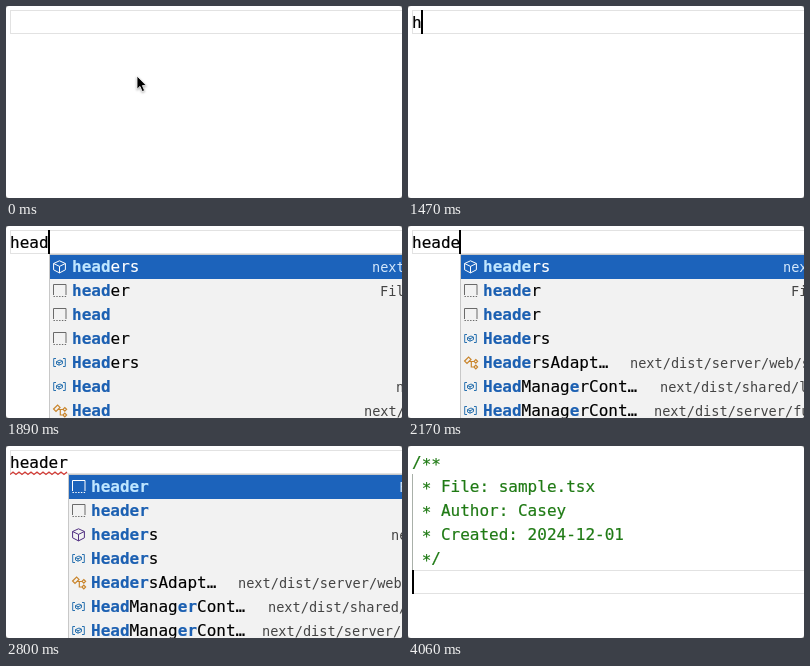
An HTML page that plays this animation: 396 by 192 pixels, repeating every 4.55 s.

```html
<!DOCTYPE html>
<html lang="en">
<head>
<meta charset="utf-8">
<title>Snippet completion</title>
<style>
html, body { margin: 0; width: 100%; height: 100%; overflow: hidden; background: #777; }
#stage { position: relative; width: 396px; height: 192px; overflow: hidden; background: #fff;
  border-radius: 3px; font: 16px/24px "DejaVu Sans Mono", monospace; color: #000; }
#stage > * { position: absolute; }
pre { margin: 0; font: inherit; -webkit-text-stroke: .2px; transform: translateY(.5px); will-change: transform; }
#line { left: 4px; width: 400px; height: 22px; border: 1px solid #e2e2e2; }
#text { left: 4px; top: 4px; }
#note { left: 4px; top: 4px; color: #1f7a14; }
#note i { position: relative; top: 2px; font-style: normal; }
#guide { left: 4px; top: 28px; width: 1px; height: 96px; background: #a9b0a9; }
#caret { width: 2px; height: 24px; background: #000; }
#squiggle { left: 4px; top: 25px; }
#popup { top: 29px; width: 460px; height: 168px; background: #f2f2f2; box-shadow: 0 0 0 1px #c8c8c8; }
.row { position: relative; height: 24px; white-space: pre; }
.row > * { position: absolute; top: 0; }
.row svg { left: 3px; top: 5px; overflow: visible; }
.label { left: 22px; -webkit-text-stroke: .15px; }
.label b { color: #1c60b2; }
.detail { font-size: 13.6px; color: #444; }
.row.on { background: #1c63bb; color: #fff; }
.on .label b { color: #bfe6ff; }
.on .detail { color: #d5e8fb; }
.on svg { color: #fff !important; }
#arrow, #beam { left: 0; top: 0; overflow: visible; }
</style>
</head>
<body>
<div id="stage">
  <div id="line"></div>
  <div id="guide"></div>
  <pre id="text"></pre>
  <pre id="note">/**
 * File: sample.tsx
 * Author: Casey
 * Created: 2024-12-01
 */</pre>
  <svg id="squiggle" width="58" height="5" fill="none" stroke="#d23a34" stroke-width="1.3"></svg>
  <div id="caret"></div>
  <div id="popup"></div>
  <svg id="beam" width="12" height="18" fill="none" stroke="#111" stroke-width="1.2">
    <path d="M54 10.6Q57 10.6 57.5 12.5Q58 10.6 61 10.6M57.5 12V24M54 25.4Q57 25.4 57.5 23.5Q58 25.4 61 25.4M56 18.5H59"/>
  </svg>
  <svg id="arrow" width="12" height="18">
    <path d="M0 0V13.2L3 10.4L5.2 15.6L7.6 14.6L5.4 9.6H9.4Z" fill="#000" stroke="#fff" stroke-width=".8"
      style="filter:drop-shadow(0 1px 1px #0005)"/>
  </svg>
</div>
<script>
const LOOP = 4550, STEP = 70, CHAR = 9.633;
const el = id => document.getElementById(id);

const icons = {
  cube: ['#4f2d80', '<path d="M6.5 .8L12.4 3.5V9.8L6.5 12.9L.6 9.8V3.5ZM.6 3.5L6.5 6.4L12.4 3.5M6.5 6.4V12.9"/>'],
  snip: ['#6a6a6a', '<path d="M.5 11V.5H13V11"/><path d="M.5 12.5H13.5" stroke-dasharray="1.4 1.4"/>'],
  vari: ['#2a72b0', '<path d="M3 2.5H.7V10.5H3M10 2.5H12.3V10.5H10M3.5 5.6L7 4L9.5 5.2V7.6L6 9.2L3.5 8ZM3.5 5.6L6 6.8L9.5 5.2M6 6.8V9.2"/>'],
  clas: ['#c9852c', '<path stroke-width="1.2" d="M.6 5L4.6 1L7 3.4L3 7.4ZM5.5 5.5H10M7.3 5.5V11H10M10 5.3L11.8 3.5L13.6 5.3L11.8 7.1ZM10 11L11.8 9.2L13.6 11L11.8 12.8Z"/>']
};

// icon, label, detail, detail offset
const headers = ['cube', 'headers', 'next/headers', 322];
const fileHeader = ['snip', 'header', 'File header', 330];
const plainHeader = ['snip', 'header'];
const typeHeaders = ['vari', 'Headers'];
const longer = [
  ['clas', 'HeadersAdapt…', 'next/dist/server/web/spec-extension', 169],
  ['vari', 'HeadManagerCont…', 'next/dist/shared/lib/head', 199],
  ['vari', 'HeadManagerCont…', 'next/dist/server/future/route', 193]
];
const lists = {
  wide: [headers, fileHeader, ['snip', 'head'], plainHeader, typeHeaders,
    ['vari', 'Head', 'next/head', 346], ['clas', 'Head', 'next/document', 314]],
  narrow: [headers, fileHeader, plainHeader, typeHeaders, ...longer],
  exact: [fileHeader, plainHeader, headers, typeHeaders, ...longer]
};

function mark(label, query) {
  let i = 0;
  return [...label].map(c => {
    if (c.toLowerCase() !== query[i]) return c;
    i++;
    return `<b>${c}</b>`;
  }).join('');
}

function rowHtml([icon, label, detail = '', x = 0], query, on) {
  const [color, shape] = icons[icon];
  return `<div class="row${on ? ' on' : ''}">` +
    `<svg width="14" height="14" fill="none" stroke="currentColor" style="color:${color}">${shape}</svg>` +
    `<span class="label">${mark(label, query)}</span>` +
    `<span class="detail" style="left:${x}px">${detail}</span></div>`;
}

// each step changes only the listed fields
const steps = [
  [0, { text: '', caret: 0, pointer: 'arrow', list: '', at: 0, squiggle: 0, note: 0, guide: 0 }],
  [630, { caret: 1, pointer: 'beam' }],
  [1190, { caret: 0 }],
  [1400, { caret: 1, pointer: '' }],
  [1470, { text: 'h' }],
  [1540, { text: 'he' }],
  [1610, { text: 'hea' }],
  [1680, { list: 'wide', at: 3 }],
  [1820, { text: 'head' }],
  [1890, { at: 4 }],
  [2100, { text: 'heade', list: 'narrow' }],
  [2170, { at: 5 }],
  [2240, { text: 'header', list: 'exact', at: 6 }],
  [2590, { squiggle: 1 }],
  [2800, { caret: 0 }],
  [3010, { list: '', caret: 1 }],
  [3080, { text: '', squiggle: 0, note: 1 }],
  [3360, { guide: .5 }],
  [3430, { guide: 1 }],
  [3500, { caret: 0 }],
  [4060, { caret: 1 }]
];

const show = (id, on) => { el(id).style.display = on ? 'block' : 'none'; };

function apply(s) {
  el('text').textContent = s.text;
  show('note', s.note);
  el('guide').style.opacity = s.guide;
  show('squiggle', s.squiggle);
  show('caret', s.caret);
  const top = s.note ? 124 : 4;
  el('line').style.top = top + 'px';
  el('caret').style.top = top + 'px';
  el('caret').style.left = Math.max(4, Math.floor(3.8 + CHAR * s.text.length)) + 'px';
  show('arrow', s.pointer === 'arrow');
  show('beam', s.pointer === 'beam');
  show('popup', s.list);
  if (s.list) {
    el('popup').style.left = Math.round(5 + CHAR * s.at) + 'px';
    el('popup').innerHTML = lists[s.list].map((r, i) => rowHtml(r, s.text, i === 0)).join('');
  }
}

function moveArrow(t) {
  const p = Math.min(1, Math.floor(t / STEP) / 8);
  const e = p * p * (3 - 2 * p);
  el('arrow').style.transform = `translate(${131 - 74 * e}px, ${70 - 52 * e}px)`;
}

let wave = 'M0 3.5';
for (let x = 3, up = true; x < 58; x += 3, up = !up) wave += `L${x} ${up ? 1 : 3.5}`;
el('squiggle').innerHTML = `<path d="${wave}"/>`;

// asterisks sit at mid height
el('note').innerHTML = el('note').textContent.replace(/\*/g, '<i>*</i>');

let last = -1;
function frame() {
  const t = (performance.now() - start) % LOOP;
  let n = 0;
  while (n + 1 < steps.length && steps[n + 1][0] <= t) n++;
  if (n !== last) {
    apply(Object.assign({}, ...steps.slice(0, n + 1).map(s => s[1])));
    last = n;
  }
  moveArrow(t);
  requestAnimationFrame(frame);
}
const start = performance.now();
frame();
</script>
</body>
</html>
```
